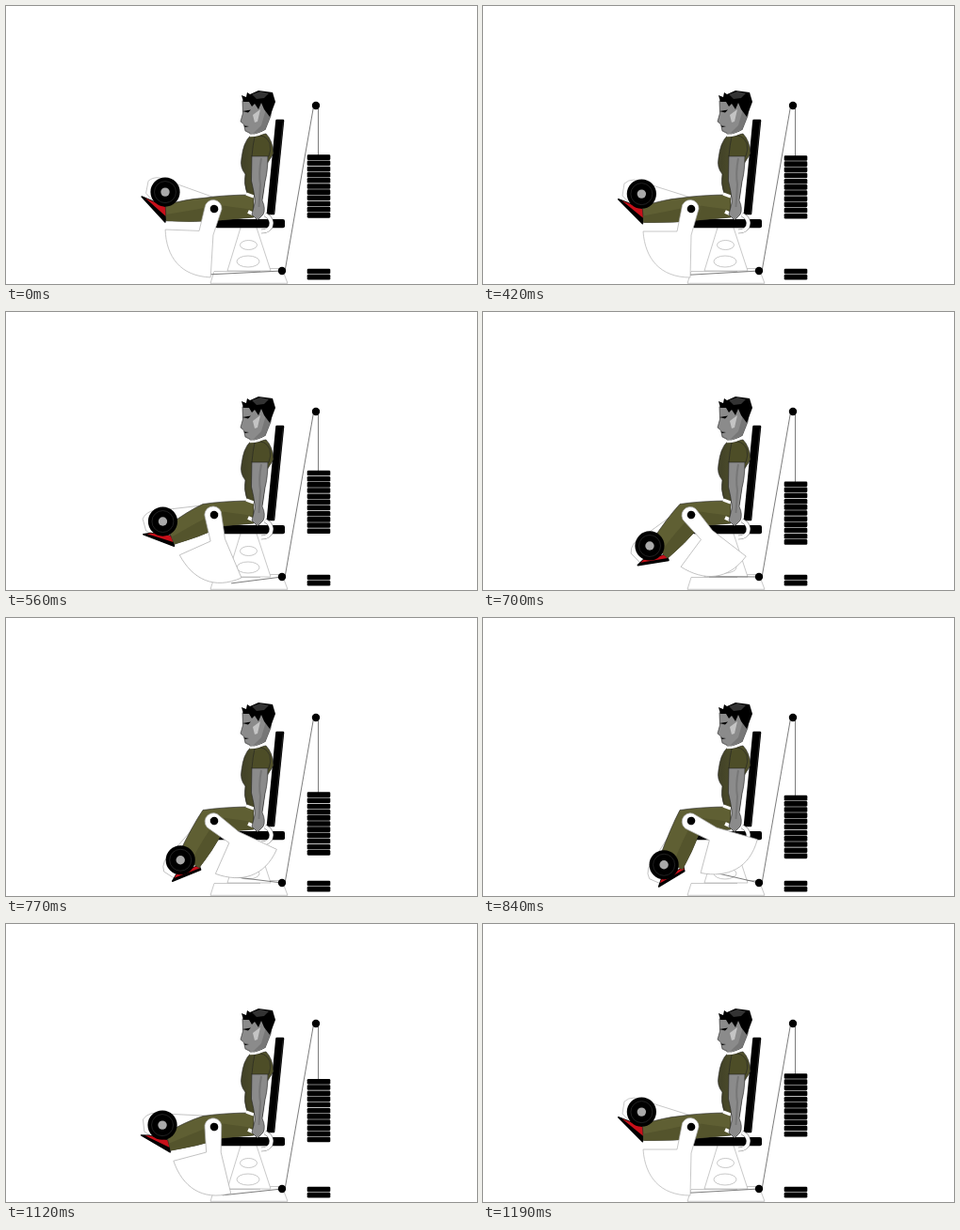
Animation, 500 px wide and 296 px high, one loop 1.61 s. Source, as an HTML page:

```html
<!DOCTYPE html>
<html lang="en">
<head>
<meta charset="utf-8">
<title>Seated leg curl</title>
<style>
html, body { margin: 0; width: 100%; height: 100%; overflow: hidden; background: #fff; }
svg { display: block; width: 500px; height: 296px; }
.frame { fill: #fff; stroke: #b0b0b0; stroke-width: .7; }
.wire { fill: none; stroke: #444; stroke-width: .7; }
.skin { fill: #8b8b8b; stroke: #222; stroke-width: .6; }
.cloth { stroke: #222; stroke-width: .6; }
</style>
</head>
<body>
<svg viewBox="0 0 500 296">
  <defs>
    <linearGradient id="shirt">
      <stop offset=".1" stop-color="#434328"/>
      <stop offset=".6" stop-color="#51512b"/>
    </linearGradient>
  </defs>

  <!-- stand -->
  <g class="frame">
    <path d="M270 282.500 H221 L217 295.300 H299 L293 279.500 H276"/>
    <path d="M249 236 L235 282 H281 L266 236"/>
    <ellipse cx="257.500" cy="254.500" rx="9" ry="5"/>
    <ellipse cx="257" cy="272" rx="12" ry="6"/>
  </g>
  <path id="pull" class="wire"/>

  <!-- weights and pulleys -->
  <path class="wire" d="M326.500 107 L296.300 281"/>
  <path id="rope" class="wire"/>
  <g id="stack"></g>
  <g id="rest"></g>
  <circle cx="329" cy="106" r="4.200"/>
  <circle cx="293" cy="282" r="4.200"/>

  <!-- seat -->
  <path d="M287.500 122 L294 122 L284 221 L278 221 Z" stroke="#000" stroke-width="2.600" stroke-linejoin="round"/>
  <path d="M294 124 L284.500 220" stroke="#333" stroke-width=".7"/>
  <rect x="222" y="227" width="74" height="9.300" rx="2"/>

  <!-- leg -->
  <path id="arm" class="frame" d="M0 -12 L-38 -24 L-60 -31 Q-67 -31 -71 -27 L-73 -14 L-58 2 L0 10 Z"/>
  <path id="shoe" stroke="#000" stroke-width="1.500" stroke-linejoin="round"/>
  <path id="upper" fill="#c8101a"/>
  <path id="leg" class="cloth" fill="#5f5f33"/>
  <path id="calf" fill="#54542c"/>
  <g id="disc">
    <circle r="15.600"/>
    <circle r="11.500" fill="none" stroke="#2a2a2a" stroke-width=".8"/>
    <circle r="4.700" fill="#aaa"/>
  </g>

  <!-- upper body -->
  <path class="cloth" fill="url(#shirt)" d="M259 138.500 L276 136 Q283 143 284 157 L277 168 L272 206 L256 200 Q252 189 254 179 Q248 172 250 162 Q252 145 259 138.500 Z"/>
  <path d="M255 200 L263 203 M273 204 L277 207" stroke="#fff" stroke-width="3.200"/>
  <path d="M257 219 L264 222" stroke="#fff" stroke-width="4"/>
  <path d="M275 222 Q284 227 281 235 Q278 240 271 240" fill="none" stroke="#777" stroke-width="4.500"/>
  <path d="M275 222 Q284 227 281 235 Q278 240 271 240" fill="none" stroke="#fff" stroke-width="3.500"/>
  <path class="skin" d="M261 159 H278 Q278 176 275 187 L272 207 Q276 216 273 222 L267 228 L261 222 L264.500 208 Q263 196 260.500 186 Z"/>
  <path d="M271 162 Q268 178 270 190 L268.500 214" fill="none" stroke="#777" stroke-width="2"/>
  <path class="cloth" fill="#4d4d27" d="M264 139 Q275 135 280 146 Q282 153 279 160 H261 Q262 148 264 139 Z"/>

  <!-- head -->
  <path class="skin" d="M251 101 L251.500 114 L249 123 L252.500 126 L254 133 L259 135.500 L261 138 L275 132 L281 117 L283 100 L268 94 Z"/>
  <path d="M276 110 L280 117 L275 131 L262 136 L271 127 Z" fill="#777"/>
  <path d="M262 116 L270 110 L267 123 L264 124 Z" fill="#c4c4c4"/>
  <path d="M251 112 L260 110.500 L257 113.500 Z M252.500 127.500 L258 128 L254 129 Z"/>
  <path d="M250 95 L255 97 L256 92 L259 94 L268 90 L283 92 L286 102 L280 118 L274 110 L271 103 L268 110 L264 104 L261 107 L258 102 L252 102 Z"/>
  <path d="M261 94 L270 91 L279 93 L274 98 L266 99 Z" fill="#333"/>
  <path d="M259 138 Q269 138 276 133" fill="none" stroke="#fff" stroke-width="2.600"/>

  <!-- lever -->
  <g id="lever">
    <path class="frame" d="M-10 -1 A9 9 0 0 1 8 0 L0 28 L-1 73 C-33 73 -49 53 -51 24 H-15 Z"/>
    <circle r="4.300"/>
  </g>
</svg>
<script>
const LOOP = 1610, HOLD = 420, STEP = 70;
const TOP = 840, HALF = 980, DOWN = 1190;
const PIVOT = [221, 216], KNEE = [209, 204.5], UNDER = [230, 228];
const REST = -2.2, SWING = 75.1;

const el = id => document.getElementById(id);
const set = (id, name, value) => el(id).setAttribute(name, value);
const mix = (a, b, u) => a.map((v, i) => v + (b[i] - v) * u);
const shift = ([x, y], dx, dy) => [x + dx, y + dy];
const poly = (...points) => `M${points.join(" L")} Z`;

// a point around the pivot; angle 0 points left, growing downwards
function orbit(radius, degrees) {
  const a = degrees * Math.PI / 180;
  return [PIVOT[0] - radius * Math.cos(a), PIVOT[1] + radius * Math.sin(a)];
}

function plates(id, count, top) {
  for (let i = 0; i < count; i++) {
    const plate = document.createElementNS("http://www.w3.org/2000/svg", "rect");
    const attrs = { x: 319.7, y: top + i * 6.17, width: 24.6, height: 5.6, rx: 1.3 };
    for (const k in attrs) plate.setAttribute(k, attrs[k]);
    el(id).append(plate);
  }
}

// curls in, starts back at the same pace, then returns faster
function bendAt(t) {
  if (t < HOLD) return REST;
  let u = 0;
  if (t < TOP) u = (t - HOLD) / (TOP - HOLD);
  else if (t < HALF) u = 1 - (t - TOP) / (TOP - HOLD);
  else if (t < DOWN) u = 2 / 3 * (DOWN - t) / (DOWN - HALF);
  return SWING * (u + .8 * u * (1 - u) * (u - .4));
}

function draw(bend) {
  const front = orbit(52, -3 + .7 * bend);
  const back = orbit(52.5, 16 + .85 * bend);
  const toe = orbit(78, -7.5 + .95 * bend);
  const heel = orbit(54, 17 + .87 * bend);
  const tip = orbit(70, -6 + .92 * bend);
  const instep = orbit(50, 1 + 1.06 * bend);
  const shin = shift(mix(KNEE, front, .4), -1, -2);
  const calf = shift(mix(back, UNDER, .5), 1, 2);
  const turn = `translate(${PIVOT}) rotate(${-bend})`;
  const drop = bend * .395;

  set("leg", "d", `M263 201 Q232 201 ${KNEE} Q${shin} ${front} L${back} Q${calf} ${UNDER} L263 225 Z`);
  set("calf", "d", `M${back} Q${calf} ${UNDER} L263 225 V217 L226 212 Q${mix(shin, calf, .5)} ${mix(front, back, .6)} Z`);
  set("shoe", "d", poly(toe, tip, instep, heel));
  set("upper", "d", poly(tip, instep, mix(instep, heel, .6), mix(tip, toe, .5)));
  set("arm", "transform", turn);
  set("lever", "transform", turn);
  set("disc", "transform", `translate(${orbit(55, bend - 16.8)})`);
  set("stack", "transform", `translate(0 ${drop})`);
  set("rope", "d", `M331.5 107 V${160 + drop}`);
  set("pull", "d", `M${215 + Math.max(0, Math.min(25, bend))} ${286.5 + .25 * bend - .0063 * bend * bend} L293 282`);
}

const start = performance.now();
function tick() {
  const t = (performance.now() - start) % LOOP;
  draw(bendAt(Math.floor(t / STEP) * STEP));
  requestAnimationFrame(tick);
}

plates("stack", 11, 159.2);
plates("rest", 2, 279.7);
tick();
</script>
</body>
</html>
```
